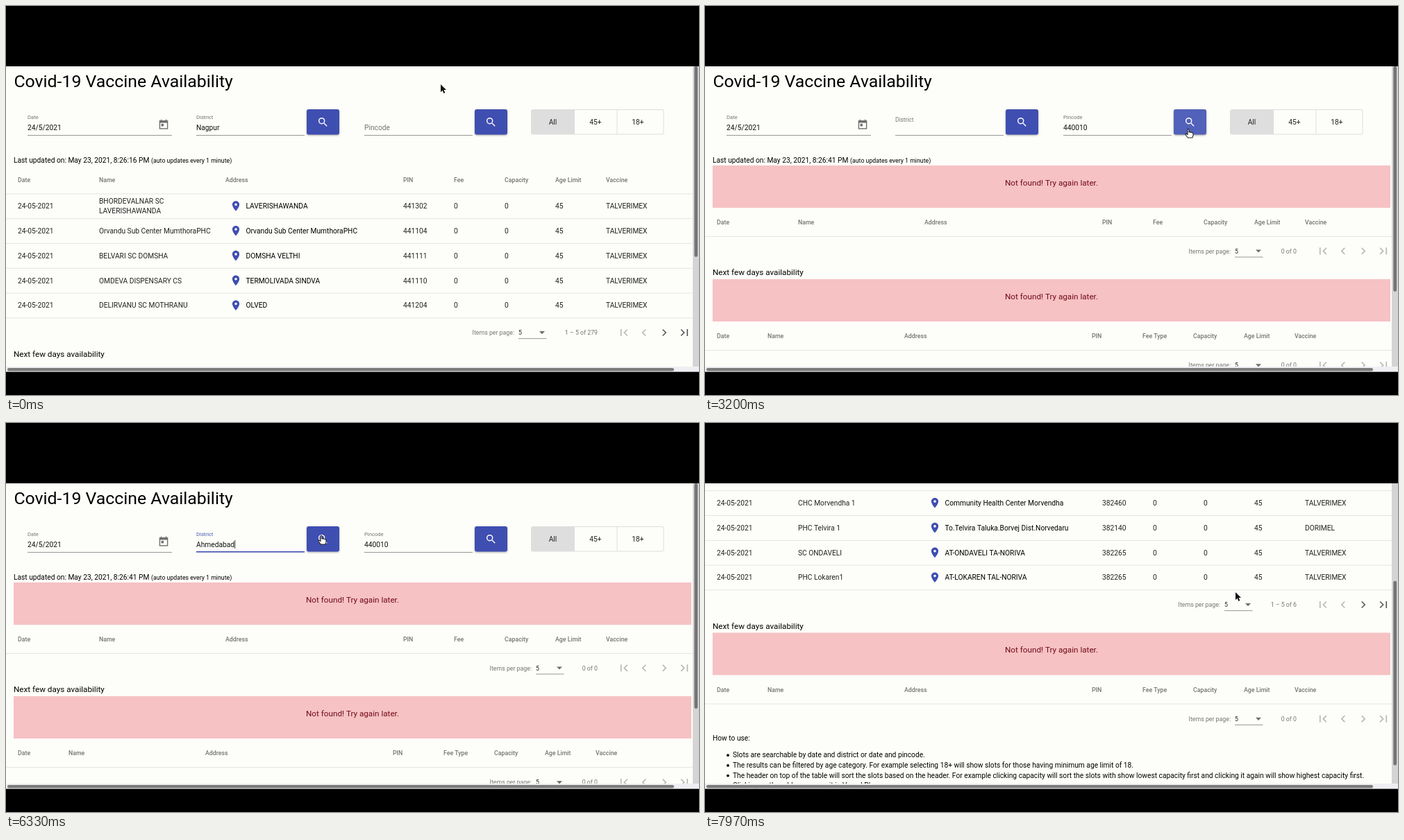
Animation of 998x561 px, one loop 8 s. Source, as an HTML page with a canvas:

```html
<!DOCTYPE html>
<html lang="en">
<head>
<meta charset="utf-8">
<title>Vaccine availability</title>
<style>
html, body { margin: 0; width: 100%; height: 100%; overflow: hidden; background: #000; }
canvas { display: block; width: 998px; height: 561px; }
</style>
</head>
<body>
<canvas id="stage" width="998" height="561"></canvas>
<script>
const ctx = document.getElementById('stage').getContext('2d');
const LOOP = 8000;
const TOP = 87, BOTTOM = 527.5;
const BODY = 10.23, SMALL = 8.77, LARGE = 11.69, LABEL = 7.67;
const PAGE = '#fdfdf9', INK = '#222', GREY = '#747474', BLUE = '#3f4eb1', LINE = '#e4e4e6';

// Moments of the interaction, in ms
const T = {
  pinFocus: 1500, pinType: 1880, pinPick: 2510, pinSearch: 3050, cleared: 3155, notFound: 3190,
  distFocus: 4350, distPick: 5320, distSearch: 6430, found: 6550
};

const COLS = [17, 134, 316, 572, 645, 718, 791, 864];
const HEADS = ['Date', 'Name', 'Address', 'PIN', 'Fee', 'Capacity', 'Age Limit', 'Vaccine'];
const NEXT_COLS = [17, 90, 287, 557, 630, 703, 776, 849];
const NEXT_HEADS = HEADS.map(h => h === 'Fee' ? 'Fee Type' : h);
const VAX_A = 'TALVERIMEX', VAX_B = 'DORIMEL';

const FIRST_ROWS = [
  ['BHORDEVALNAR SC|LAVERISHAWANDA', 'LAVERISHAWANDA', '441302', VAX_A],
  ['Orvandu Sub Center MumthoraPHC', 'Orvandu Sub Center MumthoraPHC', '441104', VAX_A],
  ['BELVARI SC DOMSHA', 'DOMSHA VELTHI', '441111', VAX_A],
  ['OMDEVA DISPENSARY CS', 'TERMOLIVADA SINDVA', '441110', VAX_A],
  ['DELIRVANU SC MOTHRANU', 'OLVED', '441204', VAX_A]
];
const FOUND_ROWS = [
  ['Belvam Childcare', 'Belvam', '382150', VAX_B],
  ['CHC Morvendha 1', 'Community Health Center Morvendha', '382460', VAX_A],
  ['PHC Telvira 1', 'To.Telvira Taluka.Borvej Dist.Norvedaru', '382140', VAX_B],
  ['SC ONDAVELI', 'AT-ONDAVELI TA-NORIVA', '382265', VAX_A],
  ['PHC Lokaren1', 'AT-LOKAREN TAL-NORIVA', '382265', VAX_A]
];
const HELP = [
  'Slots are searchable by date and district or date and pincode.',
  'The results can be filtered by age category. For example selecting 18+ will show slots for those having minimum age limit of 18.',
  'The header on top of the table will sort the slots based on the header. For example clicking capacity will sort the slots with show lowest capacity first and clicking it again will show highest capacity first.',
  'Clicking on the address opens it in Varnel Plan.'
];
const DISTRICTS = ['Adilabad', 'Agar', 'Agatti Island', 'Agra', 'Ahmedabad'];

const POINTER = [
  [0, 626, 113], [250, 626, 113], [1350, 549, 172], [2370, 549, 172], [2490, 549, 188],
  [2540, 549, 188], [2980, 696, 177], [3500, 696, 177], [4250, 358, 168], [4760, 358, 168],
  [5230, 330, 340], [5550, 330, 340], [6200, 454, 162], [6620, 454, 162], [7060, 764, 244], [LOOP, 764, 244]
];
const SCROLL = [[0, 0], [7140, 0], [7530, 171.5], [7610, 171.5], [7900, 209], [LOOP, 209]];

const PIN_ICON = new Path2D('M12 2C8.13 2 5 5.13 5 9c0 5.25 7 13 7 13s7-7.75 7-13c0-3.87-3.13-7-7-7zm0 9.5a2.5 2.5 0 1 1 0-5 2.5 2.5 0 0 1 0 5z');
const ARROW = new Path2D('M0 0V11.2L2.6 8.8 4.4 12.9 6.3 12.1 4.5 8.1H8Z');
const HAND = new Path2D('M-1 1Q0-.6 1 1V5Q2.2 4.2 3 5.3 4.2 4.6 5 5.8 6.8 5.2 7 7V9.6L5.8 13H-.6L-4 8.5Q-4.2 6.6-2.4 7.4L-1 8.7Z');

const clamp = v => Math.min(1, Math.max(0, v));
const smooth = p => p * p * (3 - 2 * p);
const settle = p => 1 - Math.pow(1 - clamp(p), 2.4);

function track(keys, t, ease) {
  const i = Math.max(1, keys.findIndex(k => k[0] >= t));
  const a = keys[i - 1], b = keys[i];
  const p = ease(clamp((t - a[0]) / (b[0] - a[0])));
  return a.slice(1).map((v, n) => v + (b[n + 1] - v) * p);
}

// y is the middle of the capital letters
function text(s, x, y, size = BODY, color = INK, weight = 400, align = 'left') {
  ctx.font = `${weight} ${size}px Roboto, sans-serif`;
  ctx.fillStyle = color;
  ctx.textAlign = align;
  ctx.fillText(s, x, y + size * 0.355);
}

function rect(x, y, w, h, color) {
  ctx.fillStyle = color;
  ctx.fillRect(x, y, w, h);
}

function round(x, y, w, h, r, color) {
  ctx.fillStyle = color;
  ctx.beginPath();
  ctx.roundRect(x, y, w, h, r);
  ctx.fill();
}

function shadowed(draw, blur, dy) {
  ctx.save();
  ctx.shadowColor = 'rgba(0,0,0,.35)';
  ctx.shadowBlur = blur;
  ctx.shadowOffsetY = dy;
  draw();
  ctx.restore();
}

// Draws in a 24-unit icon box centred on x, y
function icon(x, y, size, draw) {
  ctx.save();
  ctx.translate(x, y);
  ctx.scale(size / 24, size / 24);
  ctx.translate(-12, -12);
  draw();
  ctx.restore();
}

function lines(color, width, ...paths) {
  ctx.strokeStyle = color;
  ctx.lineWidth = width;
  ctx.beginPath();
  for (const [x, y, ...rest] of paths) {
    ctx.moveTo(x, y);
    for (let i = 0; i < rest.length; i += 2) ctx.lineTo(rest[i], rest[i + 1]);
  }
  ctx.stroke();
}

function searchButton(x, lit) {
  shadowed(() => round(x, 149, 47, 36.5, 3, lit ? '#5261b9' : BLUE), 3, 1);
  icon(x + 23.5, 167.5, 17.5, () => {
    lines('#fff', 2, [14, 14, 19.8, 19.8]);
    ctx.beginPath();
    ctx.arc(9.5, 9.5, 5.5, 0, 7);
    ctx.stroke();
  });
}

function calendar() {
  const color = '#707070';
  icon(227, 171.3, 16.8, () => {
    ctx.strokeStyle = color;
    ctx.lineWidth = 2;
    ctx.strokeRect(4, 4, 16, 16);
    rect(4, 4, 16, 4, color);
    rect(6, 1, 2, 3, color);
    rect(16, 1, 2, 3, color);
    rect(7, 10, 5, 5, color);
  });
}

function field(x, w, label, value, { up = 1, focus = false, caret = false } = {}) {
  text(label, x, 175 - 15 * up, BODY + (LABEL - BODY) * up, focus ? '#4a58b4' : GREY);
  text(value, x, 175, BODY, '#111');
  rect(x, focus ? 185 : 186, w, focus ? 1.6 : 0.9, focus ? BLUE : '#8c8c8c');
  if (caret) {
    ctx.font = `${BODY}px Roboto, sans-serif`;
    rect(x + ctx.measureText(value).width + 0.2, 169, 0.9, 12, '#222');
  }
}

function toggles() {
  round(756, 149, 191.5, 36.5, 3, '#dedede');
  rect(819, 150, 60.5, 34.5, PAGE);
  round(880.5, 150, 66, 34.5, [0, 2, 2, 0], PAGE);
  [['All', 787.5], ['45+', 849], ['18+', 910]].forEach(([s, x]) => text(s, x, 167.5, BODY, INK, 400, 'center'));
}

function headings(cols, names, y) {
  names.forEach((s, i) => text(s, cols[i], y, SMALL, GREY, 500));
  rect(0, y + 19.8, 989, 1, LINE);
}

function row([name, address, pin, vaccine], y) {
  text('24-05-2021', COLS[0], y);
  const parts = name.split('|');
  parts.forEach((s, i) => text(s, COLS[1], y + (i - (parts.length - 1) / 2) * 14.6));
  icon(331, y, 17.5, () => {
    ctx.fillStyle = BLUE;
    ctx.fill(PIN_ICON, 'evenodd');
  });
  text(address, 345.5, y, BODY, '#000');
  [pin, '0', '0', '45', vaccine].forEach((s, i) => text(s, COLS[i + 3], y));
  rect(0, y + 17.7, 989, 1, LINE);
}

function paginator(y, range, left, more) {
  text('Items per page:', left - 73, y, SMALL, GREY, 400, 'right');
  text('5', left - 67, y, SMALL, INK);
  rect(left - 67, y + 8.2, 40.5, 0.9, '#8c8c8c');
  ctx.fillStyle = '#6e6e6e';
  ctx.beginPath();
  ctx.moveTo(left - 37, y - 2);
  ctx.lineTo(left - 29, y - 2);
  ctx.lineTo(left - 33, y + 2.2);
  ctx.fill();
  text(range, 852, y, SMALL, GREY, 400, 'right');
  const off = '#b9b9b9', on = more ? '#5c5c5c' : off;
  icon(890, y, 20.4, () => lines(off, 2, [7, 6, 7, 18], [17.7, 6.7, 12.4, 12, 17.7, 17.3]));
  icon(919, y, 20.4, () => lines(off, 2, [14.7, 6.7, 9.4, 12, 14.7, 17.3]));
  icon(948, y, 20.4, () => lines(on, 2, [9.3, 6.7, 14.6, 12, 9.3, 17.3]));
  icon(977, y, 20.4, () => lines(on, 2, [17, 6, 17, 18], [6.3, 6.7, 11.6, 12, 6.3, 17.3]));
}

function notFound(y) {
  rect(11, y, 976, 61, '#f6c2c4');
  text('Not found! Try again later.', 499, y + 24.6, LARGE, '#710a18', 400, 'center');
}

function nextDays(y, empty) {
  text('Next few days availability', 11, y, LARGE, '#000');
  if (!empty) return;
  notFound(y + 10);
  headings(NEXT_COLS, NEXT_HEADS, y + 92.3);
  paginator(y + 134.2, '0 of 0', 830, false);
  text('How to use:', 11, y + 161.4, BODY, '#000');
  HELP.forEach((s, i) => {
    const ly = y + 186.2 + i * 14.7;
    ctx.fillStyle = '#000';
    ctx.beginPath();
    ctx.arc(33, ly + 0.5, 1.9, 0, 7);
    ctx.fill();
    text(s, 40, ly, BODY, '#000');
  });
}

function results(t) {
  const none = t >= T.notFound && t < T.found;
  const clock = t < T.notFound ? '16' : none ? '41' : '45';
  text(`Last updated on: May 23, 2021, 8:26:${clock} PM`, 11, 222.3, BODY, '#000');
  text('(auto updates every 1 minute)', 209, 222.8, SMALL, '#000');
  if (none) {
    notFound(230);
    headings(COLS, HEADS, 312);
    paginator(353.4, '0 of 0', 830, false);
    nextDays(384, true);
    return;
  }
  const found = t >= T.found;
  headings(COLS, HEADS, 250.6);
  (found ? FOUND_ROWS : FIRST_ROWS).forEach((r, i) => row(r, 288.5 + i * 35.8));
  paginator(471, found ? '1 – 5 of 6' : '1 – 5 of 279', found ? 815 : 805, true);
  nextDays(501.5, found);
}

function form(t) {
  const blink = since => (t - since) % 1000 < 500;
  const pinFocus = t >= T.pinFocus && t < T.pinSearch;
  const distFocus = t >= T.distFocus && t < T.distSearch;
  field(31, 208, 'Date', '24/5/2021');
  calendar();

  const district = t < T.cleared ? 'Nagpur' : t >= T.distPick ? 'Ahmedabad' : '';
  const distUp = t < T.distFocus ? 1 - settle((t - T.cleared) / 400) : settle((t - T.distFocus) / 250);
  field(274, 156, 'District', district, {
    up: distUp, focus: distFocus,
    caret: distFocus && blink(t < T.distPick ? T.distFocus : T.distPick)
  });

  const pin = t < T.pinType || t >= T.found ? '' : t < T.pinPick ? '4' : '440010';
  const pinUp = t < T.found ? settle((t - T.pinFocus) / 250) : 1 - settle((t - T.found) / 400);
  const typedAt = t < T.pinType ? T.pinFocus : t < T.pinPick ? T.pinType : T.pinPick;
  field(516, 156, 'Pincode', pin, { up: pinUp, focus: pinFocus, caret: pinFocus && blink(typedAt) });

  searchButton(433, t >= T.distSearch);
  searchButton(675, t >= T.pinSearch && t < T.distFocus);
  toggles();
}

function popups(t) {
  if (t >= T.pinType + 40 && t < T.pinPick) {
    rect(516, 181.5, 156, 17.2, '#2c2c2c');
    ctx.font = '10.5px "Noto Sans", sans-serif';
    ctx.fillStyle = '#e4e4e4';
    ctx.textAlign = 'left';
    ctx.fillText('440010', 521, 194.5);
  }
  if (t >= T.distFocus + 30 && t < T.distPick) {
    ctx.globalAlpha = clamp((t - T.distFocus) / 120);
    shadowed(() => rect(274, 187, 156.5, 187.5, '#fefefc'), 5, 2);
    DISTRICTS.forEach((s, i) => {
      const y = 204.3 + i * 35.1;
      if (i === 4 && t > 5160) rect(274, y - 17.5, 148, 35, '#f3f3f3');
      text(s, 286, y, LARGE);
    });
    rect(422, 187, 8.5, 187.5, '#cbcbcb');
    round(424.3, 189.5, 4.6, 29, 2.3, '#7f7f7f');
    ctx.globalAlpha = 1;
  }
}

function scrollbars(t, scroll) {
  const height = t < T.notFound ? 275 : t < T.found ? 325 : 266;
  rect(989, TOP, 9, 433, '#d4d4d4');
  round(991.3, TOP + scroll * 0.673, 4.8, height, 2.4, '#747474');
  rect(0, 520, 998, 8, '#efeff3');
  round(2, 522, 960, 4.6, 2.3, '#7c7c7c');
}

function pointer(t) {
  const [x, y] = track(POINTER, t, smooth);
  const inside = (l, top, r, b) => x > l && x < r && y > top && y < b;
  const open = t >= T.distFocus && t < T.distPick;
  const hand = t < T.found && (inside(433, 149, 480, 186) || inside(675, 149, 722, 186) ||
    (t > T.notFound && inside(274, 155, 430, 187)) || (open && inside(274, 187, 422, 374)));
  ctx.save();
  ctx.translate(x, y);
  ctx.lineJoin = 'round';
  ctx.lineWidth = hand ? 1.1 : 1.4;
  ctx.strokeStyle = hand ? '#222' : '#fff';
  ctx.fillStyle = hand ? '#fff' : '#111';
  const shape = hand ? HAND : ARROW;
  if (hand) { ctx.fill(shape); ctx.stroke(shape); }
  else { ctx.stroke(shape); ctx.fill(shape); }
  ctx.restore();
}

function draw(now) {
  const t = now % LOOP;
  const [scroll] = track(SCROLL, t, p => p);
  rect(0, 0, 998, 561, '#000');
  ctx.save();
  ctx.beginPath();
  ctx.rect(0, TOP, 998, BOTTOM - TOP);
  ctx.clip();
  rect(0, TOP, 998, BOTTOM - TOP, PAGE);
  ctx.save();
  ctx.translate(0, -scroll);
  text('Covid-19 Vaccine Availability', 11.4, 108.4, 24.84, '#000');
  form(t);
  results(t);
  popups(t);
  ctx.restore();
  scrollbars(t, scroll);
  pointer(t);
  ctx.restore();
}

function frame() {
  draw(performance.now());
  requestAnimationFrame(frame);
}
frame();
</script>
</body>
</html>
```
